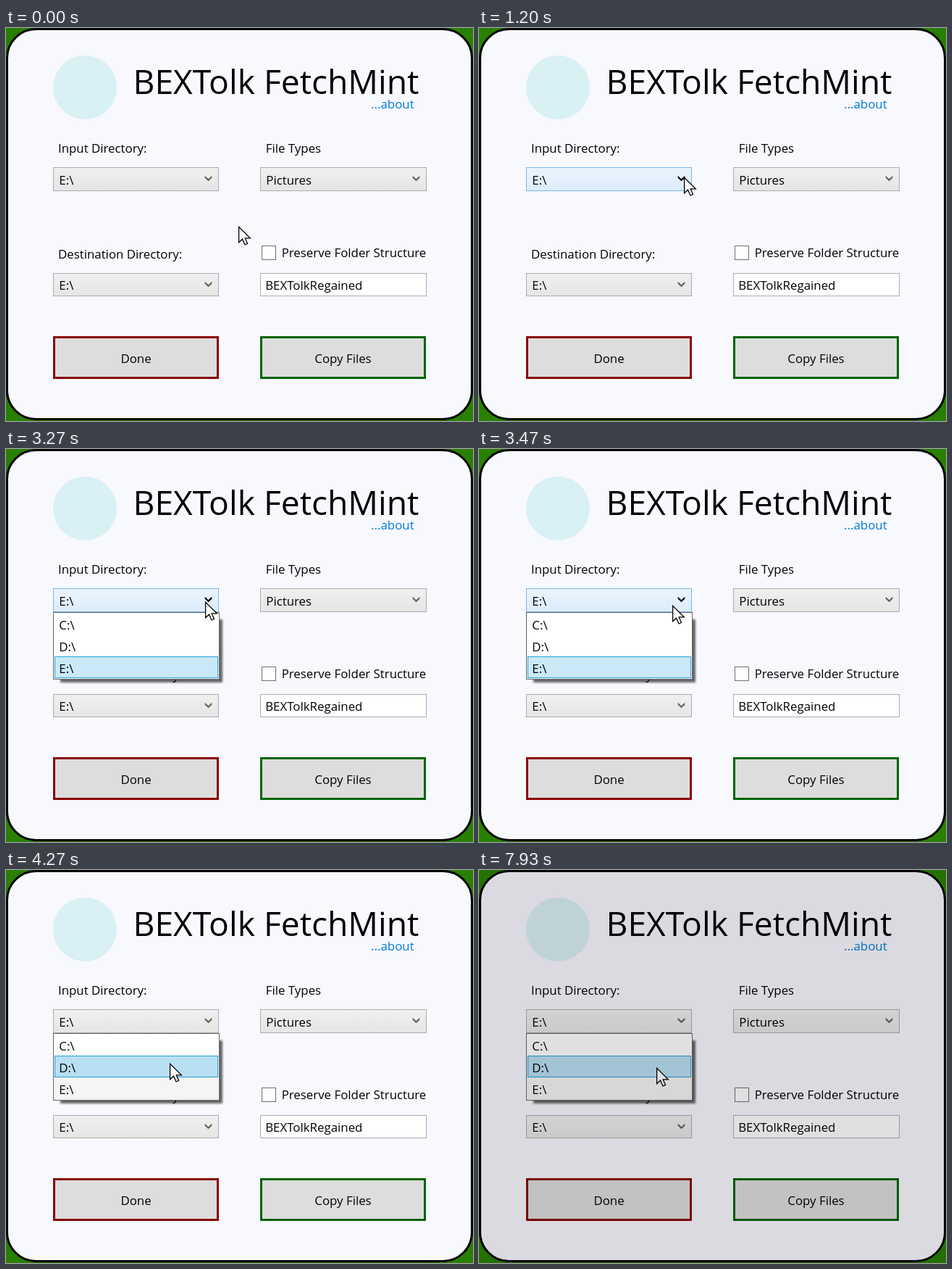
Recreate the animation shown at these times as an HTML page. Size 645x542 px, loop 8 s.

```html
<!DOCTYPE html>
<html lang="en">
<head>
<meta charset="utf-8">
<title>File picker</title>
<style>
  html, body { margin: 0; width: 100%; height: 100%; overflow: hidden; background: #298000; }
  svg { display: block; width: 645px; height: 542px; }
  text { font: 16.85px "Open Sans", "Noto Sans", sans-serif; fill: #000; white-space: pre; }
  .title { font-size: 46.2px; }
  .link { fill: #0078d7; }
  .mid { text-anchor: middle; }
  .chevron { fill: #606060; }
  .box { fill: url(#idle); stroke: #acacac; }
  .hot .box { fill: url(#hover); stroke: #7eb4ea; }
  .hot .chevron { fill: #000; }
  .button { fill: #ddd; stroke-width: 3; }
  .row rect { fill: none; stroke: none; }
  .row.selected rect { fill: #cbe8f6; stroke: #26a0da; }
  .row.over rect { fill: #b9dff2; stroke: #26a0da; }
  .row.dim rect { fill: #f5f5f5; stroke: #ededed; }
</style>
</head>
<body>
<svg viewBox="0 0 645 542" xmlns="http://www.w3.org/2000/svg">
  <defs>
    <linearGradient id="idle" x2="0" y2="1">
      <stop stop-color="#f0f0f0"/><stop offset="1" stop-color="#e5e5e5"/>
    </linearGradient>
    <linearGradient id="hover" x2="0" y2="1">
      <stop stop-color="#ebf4fc"/><stop offset="1" stop-color="#dcecfc"/>
    </linearGradient>
    <filter id="blur" x="-10%" y="-10%" width="120%" height="130%">
      <feGaussianBlur stdDeviation="1.7"/>
    </filter>
    <clipPath id="below"><rect x="60" y="225" width="250" height="110"/></clipPath>
  </defs>

  <rect width="645" height="542" fill="#298000"/>
  <rect x="1.5" y="1.5" width="642" height="538" rx="40" fill="#f8f8ff" stroke="#000" stroke-width="3"/>

  <circle cx="109" cy="82" r="44" fill="#d9f0f5"/>
  <text class="title" x="175.5" y="91">BEXTolk FetchMint</text>
  <text class="link" x="504" y="111">...about</text>

  <text x="72" y="172">Input Directory:</text>
  <text x="358.8" y="172">File Types</text>
  <text x="72" y="318">Destination Directory:</text>
  <text x="380.7" y="316">Preserve Folder Structure</text>

  <g id="combos"></g>

  <rect x="353.5" y="300.5" width="19" height="19" fill="#fff" stroke="#707070"/>
  <rect x="351.5" y="338.5" width="229" height="31" fill="#fff" stroke="#abadb3"/>
  <text x="358.2" y="361">BEXTolkRegained</text>

  <rect class="button" x="66.5" y="426.5" width="226" height="56" stroke="#8b0000"/>
  <text class="mid" x="179.5" y="462">Done</text>
  <rect class="button" x="352.5" y="426.5" width="226" height="56" stroke="#006400"/>
  <text class="mid" x="465.5" y="462">Copy Files</text>

  <g clip-path="url(#below)">
    <g id="popup">
      <rect x="75" y="235" width="224" height="87" fill="#000" opacity=".6" filter="url(#blur)"/>
      <rect x="65.5" y="225.5" width="229" height="92" fill="#fff" stroke="#646464"/>
      <g id="rows"></g>
    </g>
  </g>

  <path id="cursor" d="M.6 1.3V22.8L5.5 18.2 9 26 12.5 24.5 9.2 16.9H16.3Z" fill="#fff" stroke="#000" stroke-width="1.3"/>
  <rect id="shade" width="645" height="542" fill="#000" opacity=".12"/>
</svg>
<script>
const LOOP = 8000, STEP = 1000 / 15;
const $ = id => document.getElementById(id);

const combo = (x, y, w, h, label) => `<g>
  <rect class="box" x="${x + .5}" y="${y + .5}" width="${w - 1}" height="${h - 1}"/>
  <text x="${x + 8.3}" y="${y + h / 2 + 7}">${label}</text>
  <path class="chevron" d="M${x + w - 19.3} ${y + 14.7}l4.8 4.6 4.8-4.6v-3l-4.8 4.6-4.8-4.6z"/></g>`;

$('combos').innerHTML =
  combo(65, 192, 229, 33, 'E:\\') +
  combo(351, 192, 230, 33, 'Pictures') +
  combo(65, 338, 229, 32, 'E:\\');

$('rows').innerHTML = ['C', 'D', 'E'].map((d, i) => `<g class="row">
  <rect x="67.5" y="${226.5 + 30 * i}" width="225" height="29"/>
  <text x="73.3" y="${249 + 30 * i}">${d}:\\</text></g>`).join('');

const input = $('combos').children[0];
const rows = [...$('rows').children];

const smooth = p => p * p * (3 - 2 * p);
const speedUp = p => p * p;
const jump = p => p < 1 ? 0 : 1;

// time, x, y, easing towards this point
const path = [
  [333, 321, 273],
  [1200, 283, 205, smooth],
  [2533, 283, 204, jump],
  [2667, 283, 203, jump],
  [2733, 283, 205, jump],
  [2800, 283, 205, jump],
  [3467, 267, 215, speedUp],
  [4267, 226, 266, smooth],
  [5533, 226, 266, jump],
  [5867, 245, 272, smooth]
];

function cursorAt(t) {
  const i = path.findIndex(k => k[0] > t);
  if (i === 0) return path[0].slice(1, 3);
  if (i < 0) return path[path.length - 1].slice(1, 3);
  const [t0, x0, y0] = path[i - 1], [t1, x1, y1, ease] = path[i];
  const p = ease((t - t0) / (t1 - t0));
  return [Math.round(x0 + (x1 - x0) * p), Math.round(y0 + (y1 - y0) * p)];
}

function draw(time) {
  const step = Math.floor((time + 3.5) / STEP);
  const t = step * STEP + .5;
  const [x, y] = cursorAt(t);
  $('cursor').setAttribute('transform', `translate(${x} ${y})`);

  const open = Math.max(0, Math.min(1, (step - 42) / 3));
  $('popup').style.display = open ? '' : 'none';
  $('popup').setAttribute('transform', `translate(0 ${-98 * (1 - open)})`);

  input.setAttribute('class', x < 294 && y < 226 ? 'hot' : '');
  const over = open && y >= 226 ? Math.floor((y - 226) / 30) : -1;
  rows.forEach((row, i) => {
    const state = i === over ? 'over' : i < 2 ? '' : over < 0 ? 'selected' : 'dim';
    row.setAttribute('class', 'row ' + state);
  });

  $('shade').style.display = step >= 119 ? '' : 'none';
}

const start = performance.now();
function tick() {
  draw((performance.now() - start) % LOOP);
  requestAnimationFrame(tick);
}
tick();
</script>
</body>
</html>
```
